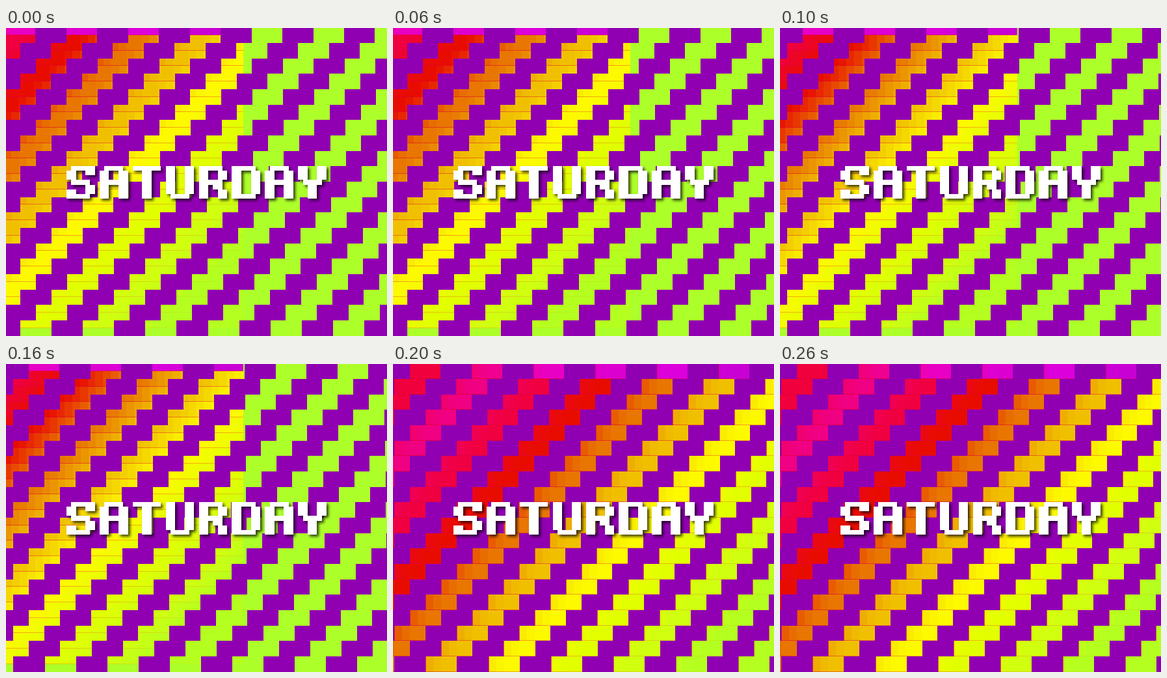
Recreate the animation shown at these times as an HTML page with a canvas. Size 586 by 473 pixels, loop 0.3 s.

```html
<!DOCTYPE html>
<html lang="en">
<head>
<meta charset="utf-8">
<title>Saturday</title>
<style>
html, body { margin: 0; width: 100%; height: 100%; overflow: hidden; background: #9000b2; }
canvas { display: block; }
</style>
</head>
<body>
<canvas id="stage" width="586" height="473" role="img" aria-label="SATURDAY"></canvas>
<script>
const W = 586, H = 473, ROWS = 20;
const ROW = H / ROWS, PERIOD = 94.9, GROW = 0.0007;
const PURPLE = '#9000b2', LIME = '#adff2a';

// Each pose: stripe start in the top row, and the offset of the rainbow
const POSES = [
  { start: -2, dx: 221, dy: 12 },
  { start: 35, dx: 221, dy: 12 },
  { start: 26, dx: 0, dy: 0, edges: true }
];
const HOLD = 100, ORIGIN = 26, STEPS = 8;

const RAINBOW = ['f0003c', 'f00082', 'f00040', 'e80c00', 'e87600',
  'f0c000', 'fdfa00', 'e2ff00', 'd0ff10', 'b4ff20'].map(rgb);
const TOP = ['f0003c', 'f00090', 'e800c4', 'dc00d0', 'dc00dc', 'c800d4'].map(rgb);

const GLYPHS = {
  S: '.11111 11..11 11.... .1111. ....11 11..11 11111.',
  A: '.1111. 11..11 11..11 111111 11..11 11..11 11..11',
  T: '111111 ..11.. ..11.. ..11.. ..11.. ..11.. ..11..',
  U: '11..11 11..11 11..11 11..11 11..11 11..11 .1111.',
  R: '11111. 11..11 11..11 11111. 11.11. 11..11 11..11',
  D: '11111. 11..11 11..11 11..11 11..11 11..11 11111.',
  Y: '11..11 11..11 11..11 .1111. ..11.. ..11.. ..11..'
};

function rgb(hex) {
  return [0, 2, 4].map(i => parseInt(hex.slice(i, i + 2), 16));
}

function mix(stops, t) {
  t = Math.min(Math.max(t, 0), stops.length - 1);
  const i = Math.min(Math.floor(t), stops.length - 2);
  const c = stops[i].map((v, k) => Math.round(v + (stops[i + 1][k] - v) * (t - i)));
  return `rgb(${c})`;
}

// Holds each colour for a quarter stripe, then blends into the next
function ramp(n) {
  const s = n - 0.25, i = Math.floor(s);
  return i + Math.max(0, (s - i - 0.25) / 0.75);
}

function layer(paint) {
  const c = document.createElement('canvas');
  c.width = W;
  c.height = H;
  paint(c.getContext('2d'));
  return c;
}

const rowTop = r => Math.floor(r * ROW);

// Stripes step a quarter period left per row and widen slightly downwards
const stripeX = (start, r, k) =>
  Math.round((start + (k - (r % 4) / 4) * PERIOD) * (1 + r * GROW));

function paintRainbow(g) {
  for (let r = 0; r < ROWS; r++) {
    const y = rowTop(r), h = rowTop(r + 1) - y;
    const wraps = Math.floor(r / 4);
    for (let i = -STEPS; i < 7 * STEPS; i++) {
      const x = stripeX(ORIGIN, r, i / STEPS);
      const w = stripeX(ORIGIN, r, (i + 1) / STEPS) - x;
      const n = wraps + (i + 0.5) / STEPS;
      g.fillStyle = mix(r ? RAINBOW : TOP, ramp(n));
      g.fillRect(x, y, w, h);
      g.fillStyle = `rgba(224,0,60,${Math.max(0, 0.9 - n * 0.09)})`;
      g.fillRect(x, y + h - 1, w, 1);
    }
  }
}

function paintWord(g) {
  const size = 7.27;
  const px = n => Math.round(93 + n * size);
  const py = n => Math.round(211.6 + n * size);
  g.fillStyle = '#fff';
  [...'SATURDAY'].forEach((ch, n) => {
    GLYPHS[ch].split(' ').forEach((line, r) => {
      [...line].forEach((bit, c) => {
        if (bit !== '1') return;
        const col = n * 7 + c;
        g.fillRect(px(col), py(r), px(col + 1) - px(col), py(r + 1) - py(r));
      });
    });
  });
}

const rainbow = layer(paintRainbow);
const word = layer(paintWord);

function blocks(start) {
  const list = [];
  for (let r = 0; r < ROWS; r++) {
    const y = rowTop(r), h = rowTop(r + 1) - y;
    for (let k = -1; k < 7; k++) {
      const x = stripeX(start, r, k);
      list.push([x, y, stripeX(start, r, k + 0.5) - x, h]);
    }
  }
  return list;
}

function paintPose(g, { start, dx, dy, edges }) {
  const list = blocks(start);
  g.fillStyle = PURPLE;
  g.fillRect(0, 0, W, H);
  g.save();
  g.beginPath();
  list.forEach(b => g.rect(...b));
  g.clip();
  g.fillStyle = LIME;
  g.fillRect(0, 0, W, H);
  g.drawImage(rainbow, -dx, -dy);
  g.restore();
  if (edges) {
    g.fillStyle = 'rgba(224,0,70,.65)';
    list.forEach(([x, y, , h]) => g.fillRect(x, y, 1, h));
  }
  g.shadowColor = 'rgba(0,0,0,.75)';
  g.shadowBlur = 4;
  g.shadowOffsetX = 3;
  g.shadowOffsetY = 3;
  g.drawImage(word, 0, 0);
}

const scenes = POSES.map(p => layer(g => paintPose(g, p)));
const ctx = document.getElementById('stage').getContext('2d');
const begin = performance.now();

function draw(now) {
  const t = Math.max(0, now - begin);
  ctx.drawImage(scenes[Math.floor(t / HOLD) % scenes.length], 0, 0);
  requestAnimationFrame(draw);
}
draw(begin);
</script>
</body>
</html>
```
